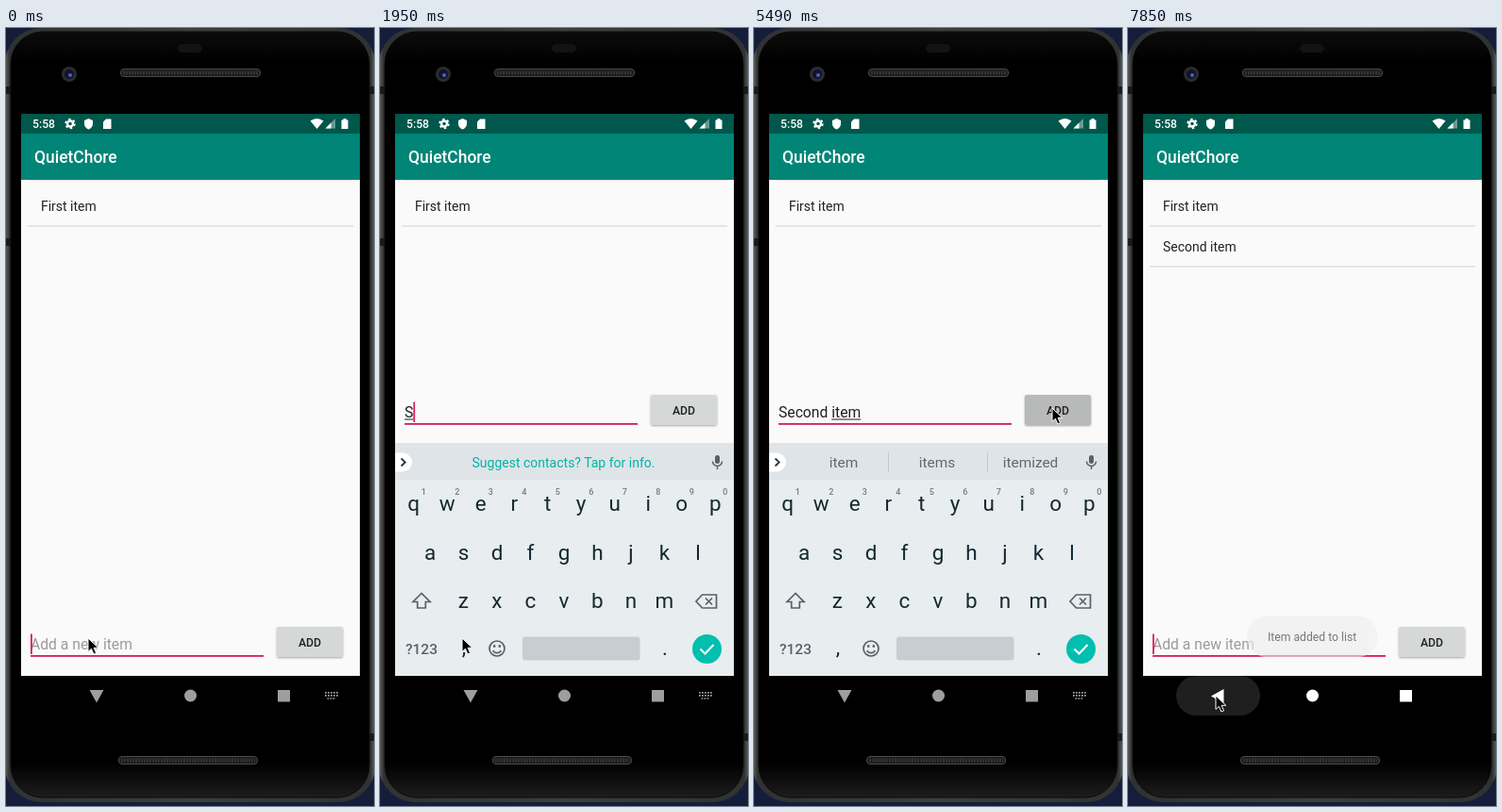
An HTML page for the animation above (7.99 s loop, 390 by 825 pixels).

```html
<!DOCTYPE html>
<html lang="en">
<head>
<meta charset="utf-8">
<title>To-do list demo</title>
<style>
  html, body { margin: 0; width: 100%; height: 100%; overflow: hidden; background: #141d3a; }
  svg { display: block; width: 390px; height: 825px; font-family: Roboto, "Noto Sans", sans-serif; }
  text { white-space: pre; }
  .mid { text-anchor: middle; }
  .medium { font-weight: 500; }
  .line { fill: none; stroke: #566269; stroke-width: 1.7; }
</style>
</head>
<body>
<svg viewBox="0 0 390 825">
  <defs>
    <linearGradient id="metal">
      <stop offset="0" stop-color="#636565"/><stop offset=".012" stop-color="#303232"/>
      <stop offset=".5" stop-color="#3c3e3e"/>
      <stop offset=".988" stop-color="#303232"/><stop offset="1" stop-color="#636565"/>
    </linearGradient>
    <linearGradient id="glass" x2="0" y2="1">
      <stop offset="0" stop-color="#0c0c0c"/><stop offset=".04" stop-color="#000"/>
      <stop offset=".955" stop-color="#000"/><stop offset="1" stop-color="#1d1d1d"/>
    </linearGradient>
    <filter id="shadow" x="-10%" y="-20%" width="120%" height="150%">
      <feDropShadow dx="0" dy="1" stdDeviation="1" flood-opacity=".35"/>
    </filter>
  </defs>

  <!-- phone -->
  <rect x="-1" y="0" width="392" height="821" rx="38" fill="url(#metal)"/>
  <path d="M0 66h5M0 227h5M385 66h5M385 752h5" stroke="#191b1b" stroke-width="8"/>
  <rect x="5" y="4" width="380" height="812" rx="34" fill="url(#glass)" stroke="#0a0a0a"/>
  <rect x="182" y="17" width="26" height="9" rx="4.5" fill="#121217"/>
  <circle cx="67" cy="49" r="8" fill="#2b2b30"/>
  <circle cx="67" cy="49" r="5" fill="#10132c"/>
  <circle cx="68" cy="50" r="2" fill="#5361b5"/>
  <g fill="#1b1b1b" stroke="#4b4b4b">
    <rect x="121.500" y="43.500" width="148" height="8" rx="3.500"/>
    <rect x="119.500" y="772.500" width="147" height="8" rx="3.500"/>
  </g>
  <path d="M124 47.500h143M122 776.500h142" stroke="#333" stroke-width="4" stroke-dasharray="2 1"/>

  <!-- app -->
  <rect x="16" y="91" width="359" height="596" fill="#fafafa"/>
  <rect x="16" y="91" width="359" height="21" fill="#00574b"/>
  <rect x="16" y="112" width="359" height="49" fill="#008577"/>
  <g fill="#fff">
    <text class="medium" x="28" y="106" font-size="12.200">5:58</text>
    <g fill="none" stroke="#fff">
      <circle cx="68" cy="101.500" r="3" stroke-width="2.400"/>
      <circle cx="68" cy="101.500" r="4.800" stroke-width="1.800" stroke-dasharray="2.500 2.526"/>
    </g>
    <path d="M87.500 96l4.500 2v3.500q0 4-4.500 6q-4.500-2-4.500-6v-3.500z"/>
    <path d="M106 96.500h5.500v10.500h-8.500v-7.500z"/>
    <path d="M322.500 98.500q7-5 14 0l-7 8.500z"/>
    <path d="M349 96v10.500h-10.500z" opacity=".4"/>
    <path d="M344.500 100.500v6h-6z"/>
    <path d="M355.500 97.500h2v-1.500h3v1.500h2v9.500h-7z"/>
    <text class="medium" x="30" y="143" font-size="17.460">QuietChore</text>
  </g>
  <path d="M23 161.500h345" stroke="#000" opacity=".08"/>
  <g font-size="13.970" fill="#212121">
    <text x="37" y="194">First item</text>
    <path d="M23 210h345" stroke="#dedede" stroke-width="1.600"/>
    <g id="newRow">
      <text x="37" y="237">Second item</text>
      <path d="M23 253h345" stroke="#dedede" stroke-width="1.600"/>
    </g>
  </g>

  <g id="form">
    <g font-size="15.700">
      <text id="hint" x="26" y="413" fill="#9b9b9b">Add a new item</text>
      <text id="entry" x="26" y="413" fill="#212121"></text>
    </g>
    <rect id="under" y="414.500" height="1" fill="#212121"/>
    <rect x="26" y="419" width="247" height="1.800" fill="#d81b60"/>
    <rect id="caret" y="396.500" width="1.800" height="21.500" fill="#e01a62"/>
    <rect id="button" x="287" y="389" width="70" height="32" rx="2" filter="url(#shadow)"/>
    <text class="mid medium" x="322" y="410" font-size="12.200" fill="#212121">ADD</text>
  </g>

  <!-- navigation bar -->
  <rect x="16" y="687" width="359" height="42"/>
  <rect id="ripple" x="51" y="687" width="89" height="42" rx="21" fill="#1f1f1f"/>
  <g id="nav">
    <path id="back" d="M88.500 702h15l-7.500 13.500z"/>
    <circle cx="195.500" cy="708" r="6.500"/>
    <rect x="288" y="702" width="13" height="12.500"/>
    <path id="imeIcon" d="M338 704.800h14M338 707.800h14M340.500 711h9" stroke="#9e9e9e" stroke-width="1.700" stroke-dasharray="1.800 1.200"/>
  </g>

  <g id="board">
    <rect x="16" y="440" width="359" height="247" fill="#e8edf0"/>
    <rect x="16" y="440" width="359" height="39" fill="#dfe4e8"/>
    <path d="M16 450.500h8a10 10 0 0 1 0 20h-8z" fill="#fff"/>
    <path d="M22.500 456.500l4.200 4-4.200 4" fill="none" stroke="#263238" stroke-width="1.800"/>
    <rect x="355" y="453" width="5" height="9" rx="2.500" fill="#566269"/>
    <path class="line" d="M352.500 459.500a5 5 0 0 0 10 0M357.500 464.500v3.500" style="stroke-width:1.500"/>
    <text id="prompt" class="mid" x="194.500" y="465.500" font-size="14" fill="#00b5a4">Suggest contacts? Tap for info.</text>
    <g id="words" class="mid" font-size="15.400" fill="#5f696e">
      <path d="M142.500 450v21M247.500 450v21" stroke="#c3c9cd"/>
      <text x="95" y="466"></text><text x="194" y="466"></text><text x="293" y="466"></text>
    </g>
    <g id="keys" class="mid" font-size="22.500" fill="#14292f"></g>
    <path class="line" d="M44 599.500l-9 9h4.700v6.500h8.600v-6.500h4.700z"/>
    <path class="line" d="M341.500 601h15v14h-15l-6.500-7zM345 604.500l7 7m0-7l-7 7"/>
    <text class="medium" x="27" y="663.500" font-size="15.500" fill="#566269">?123</text>
    <circle class="line" cx="124" cy="658" r="8"/>
    <path class="line" d="M119.800 660a4.600 4.600 0 0 0 8.400 0"/>
    <path d="M120 655.500h2.400m3.200 0h2.400" stroke="#566269" stroke-width="2.400"/>
    <rect x="151" y="645.500" width="124.500" height="25" rx="3" fill="#c8cdd1"/>
    <circle cx="346.500" cy="658.500" r="15.500" fill="#00bfae"/>
    <path d="M339.500 658.500l5 5 9-9.500" fill="none" stroke="#fff" stroke-width="2"/>
  </g>

  <g id="toast">
    <rect x="126" y="623.500" width="138.500" height="43.500" rx="21" fill="#eee"/>
    <text x="148" y="649.800" font-size="12.200" fill="#222">Item added to list</text>
  </g>
  <path id="mouse" d="M0 0v14.500l3.400-3.200 2.500 5.700 2.700-1.200-2.500-5.500h4.700z" stroke="#fff" stroke-width="1"/>
</svg>
<script>
const LOOP = 7990;
const $ = id => document.getElementById(id);
const set = (id, attrs) => { for (const k in attrs) $(id).setAttribute(k, attrs[k]); };
const show = (id, on) => set(id, { visibility: on ? 'visible' : 'hidden' });

// Latest entry [time, ...values] that has begun
const at = (list, t) => list.filter(e => e[0] <= t).pop();

const typing = [
  [0, ''], [1950, 'S'],
  [2100, 'Se', 'Se|See|Seen'], [2240, 'Sec', 'Sec|Second|Secret'],
  [2390, 'Seco', 'Seco|Second|Seconds'], [2690, 'Secon', 'Secon|Second|Secondary'],
  [2830, 'Second', 'Second|Seconds|Secondary'], [3130, 'Second ', 'time|half|one'],
  [3420, 'Second i', 'i|I|is'], [3570, 'Second it', "it|its|it's"],
  [3720, 'Second ite', 'ite|items|item'], [4010, 'Second item', 'item|items|itemized'],
  [5640, '']
];
const caretOff = [[450, 1050], [1500, 1950], [4600, 5050], [5490, 5640], [6080, 6680], [7120, 7700]];
const toastFade = [[0, 0], [5780, .35], [5930, .75], [6080, 1], [7700, .82], [7850, .6]];
// Opacity and downward shift
const boardPose = [[0, 0, 0], [150, .78, 7], [300, 1, 0], [7700, .45, 6], [7850, 0, 0]];
const press = [[0, '#d6d7d7'], [5490, '#b8b9b9'], [5640, '#c6c7c7'], [5780, '#d6d7d7']];
const turn = [[0, 0], [7700, 45], [7850, 90]];
const rippleFade = [[0, 0], [7410, .5], [7550, 1]];

function key(ch, x, y) {
  return `<text x="${x}" y="${y}">${ch}</text>`;
}
$('keys').innerHTML =
  [['qwertyuiop', 35.7, 512], ['asdfghjkl', 53, 563.5], ['zxcvbnm', 88.4, 615]].map(([row, x, y]) =>
    [...row].map((ch, i) => key(ch, x + 35.5 * i, y)).join('')).join('') +
  key(',', 89, 664) + key('.', 302, 665) +
  '<g class="medium" font-size="9" fill="#727c81">' +
  [...'1234567890'].map((ch, i) => key(ch, 46.3 + 35.5 * i, 495)).join('') + '</g>';

const steps = (t, start, n) => Math.max(0, Math.min(1, (Math.floor((t - start) / 145) + 1) / n));

function mousePos(t) {
  if (t < 6680) {
    const u = steps(t, 4310, 7), e = u * u * (3 - 2 * u);
    return [87 + 229 * e, 647 - 244 * e];
  }
  const left = 1 - steps(t, 6680, 6);
  return [93 + 223 * left ** 3.7, 708 - 305 * left ** 1.93];
}

let lastText;
function setEntry(text, words) {
  if (text === lastText) return;
  lastText = text;
  $('entry').textContent = text;
  show('hint', !text);
  show('prompt', !words);
  show('words', words);
  if (words) words.split('|').forEach((w, i) => $('words').querySelectorAll('text')[i].textContent = w);
}

function draw(t) {
  const [, text, words] = at(typing, t);
  setEntry(text, words);
  const entry = $('entry'), start = text.lastIndexOf(' ') + 1;
  const width = text ? entry.getComputedTextLength() : 0;
  const from = start ? entry.getSubStringLength(0, start) : 0;
  set('under', { x: 26 + from, width: Math.max(0, width - from) });
  set('caret', { x: 26 + width });
  show('caret', !caretOff.some(([a, b]) => t >= a && t < b));

  const open = t >= 150 && t < 7700;
  set('form', { transform: `translate(0 ${open ? 0 : 246})` });
  set('button', { fill: at(press, t)[1] });
  show('newRow', t >= 5640);

  const [, alpha, shift] = at(boardPose, t);
  set('board', { opacity: alpha, transform: `translate(0 ${shift})` });
  set('toast', { opacity: at(toastFade, t)[1] });

  set('ripple', { opacity: at(rippleFade, t)[1] });
  set('nav', { fill: t >= 7850 ? '#fff' : t >= 7700 ? '#d0d0d0' : '#9e9e9e' });
  set('back', { transform: `rotate(${at(turn, t)[1]} 95.5 708)` });
  show('imeIcon', t < 7700);
  set('mouse', { transform: `translate(${mousePos(t)})` });
}

const began = performance.now();
function tick() {
  draw((performance.now() - began) % LOOP);
  requestAnimationFrame(tick);
}
tick();
</script>
</body>
</html>
```
